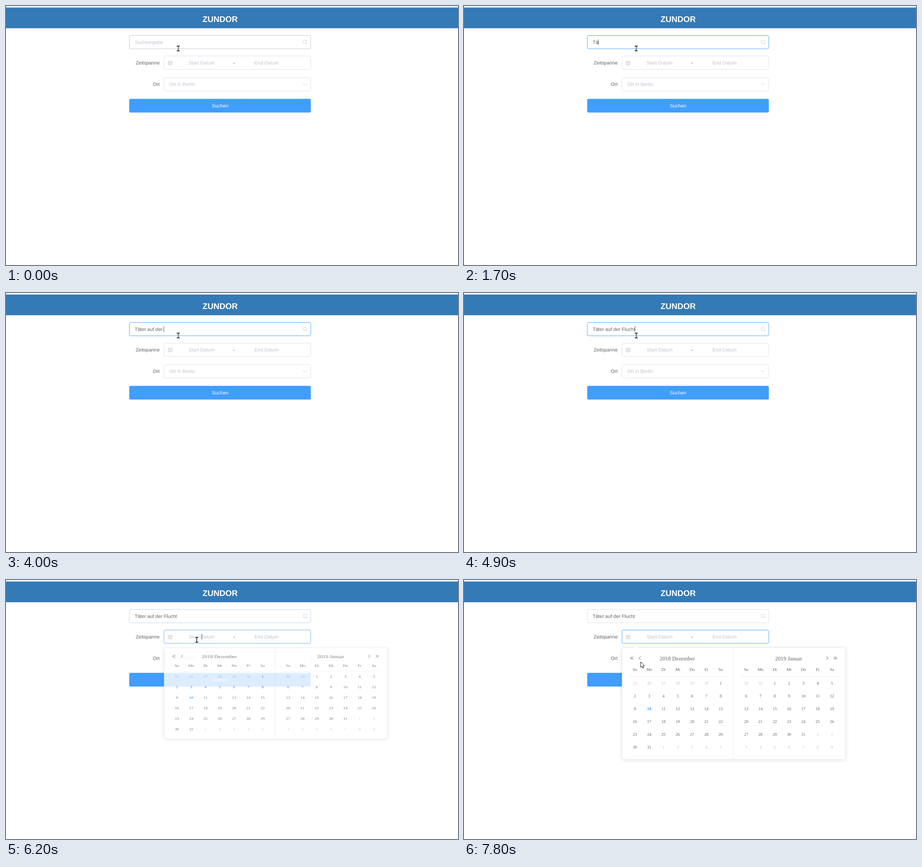
An HTML page for the animation above (8000 ms loop, 988x567 px).

```html
<!DOCTYPE html>
<html lang="de">
<head>
<meta charset="utf-8">
<title>Suche</title>
<style>
  html, body { margin: 0; width: 100%; height: 100%; overflow: hidden; background: #fff; }
  svg { display: block; width: 100%; height: 100%; }
  text { font: 10.6px "Liberation Sans", Arial, sans-serif; fill: #606266; font-kerning: none;
         white-space: pre; text-rendering: geometricPrecision; }
  .mid { text-anchor: middle; }
  .end { text-anchor: end; }
  .hint { fill: #c0c4cc; }
  .field { fill: #fff; stroke: #dcdfe6; stroke-width: .9; }
  .icon { fill: none; stroke: #c0c4cc; stroke-width: .8; }
  .nav { fill: none; stroke: #303133; stroke-width: .85; }
  .caret { fill: #303133; }
  .panel { fill: #fff; stroke: #e4e7ed; stroke-width: .8; filter: drop-shadow(0 1.5px 4px rgba(0, 0, 0, .11)); }
  .rule { stroke: #ebeef5; stroke-width: .9; }
  #popup text { font: 9.2px "Liberation Serif", "Times New Roman", serif; text-anchor: middle; }
  #popup .title { font-size: 12.1px; }
  #popup .out { fill: #c0c4cc; }
  #popup .today { fill: #409eff; font-weight: bold; }
  #popup .hover { fill: #409eff; }
</style>
</head>
<body>
<svg viewBox="0 0 988 567">
  <rect y="3.3" width="988" height="45.4" fill="#337ab7"/>
  <text class="mid" x="468" y="35" style="font-size:18px;font-weight:bold;fill:#fff">ZUNDOR</text>

  <rect id="search" class="field" x="269.6" y="64.5" width="396.5" height="29.2" rx="3"/>
  <text id="searchHint" class="hint" x="281.2" y="82.6">Sucheingabe</text>
  <text id="typed" x="281.2" y="82.6"></text>
  <rect id="searchCaret" class="caret" y="73" width=".85" height="12"/>
  <g class="icon"><circle cx="653.2" cy="78.6" r="3.9"/><path d="M656 81.4l2.4 2.4"/></g>

  <text class="end" x="335.8" y="128">Zeitspanne</text>
  <rect id="dates" class="field" x="345.3" y="109.5" width="320.8" height="29.2" rx="3"/>
  <path class="icon" d="M354.5 121.2h8.4v7.7h-8.4zM354.5 123.3h8.4M356.6 119.8v2.2M360.8 119.8v2.2M356 125.2h5.4M356 127.1h5.4"/>
  <text class="hint mid" x="427.5" y="128">Start Datum</text>
  <text class="mid" x="498.5" y="128" style="fill:#303133">-</text>
  <text class="hint mid" x="569.5" y="128">End Datum</text>
  <rect id="dateCaret" class="caret" x="427.7" y="118" width=".85" height="12"/>

  <text class="end" x="335.8" y="175.2">Ort</text>
  <rect class="field" x="345.3" y="156.9" width="320.8" height="29.2" rx="3"/>
  <text class="hint" x="357" y="175.2">Ort in Berlin</text>
  <path class="icon" d="M649.4 169.3l4 4 4-4"/>

  <rect x="269.3" y="203.3" width="397" height="30" rx="3" fill="#409eff"/>
  <text class="mid" x="468" y="222" style="fill:#fff">Suchen</text>

  <g id="popup">
    <rect class="panel" x="345.4" y="148.4" width="488" height="244.4" rx="3"/>
    <path d="M372 148.9l4.5-4.6 4.5 4.6z" fill="#fff"/>
    <path d="M372 148.4l4.5-4.6 4.5 4.6" fill="none" stroke="#f0f2f6" stroke-width=".7"/>
    <path d="M588.6 148.8v243.6" stroke="#e4e4e4" stroke-width=".8"/>
    <path class="nav" d="M366.6 167.8l-3 3.2 3 3.2M369.8 167.8l-3 3.2 3 3.2M386.2 167.5l-3.4 3.5 3.4 3.5"/>
    <path class="nav" d="M792.2 167.5l3.4 3.5-3.4 3.5M808.6 167.8l3 3.2-3 3.2M811.8 167.8l3 3.2-3 3.2"/>
  </g>

  <g id="cursor">
    <g id="beam" fill="none" stroke-linecap="round">
      <path id="beamShape" d="M-2.7-5.2H2.7M0-5V5M-2.7 5.2H2.7" stroke="#fff" stroke-width="3"/>
      <path d="M-2.7-5.2H2.7M0-5V5M-2.7 5.2H2.7" stroke="#111" stroke-width="1.6"/>
      <path d="M0-3.4V3.4" stroke="#999" stroke-width=".5"/>
    </g>
    <path id="arrow" d="M0 0V12L2.8 9.6L4.7 13.7L6.7 12.8L4.9 8.8H8.6Z" fill="#fff" stroke="#111" stroke-width="1"/>
    <path id="hand" d="M3.2 7.2V1.2Q4.2-.2 5.2 1.2V4.6L10 5.6Q11.4 6 11.2 7.6L10.2 11.6H4.6L.7 7.4Q1.2 6 3.2 7.2Z" fill="#fff" stroke="#111" stroke-width=".9"/>
  </g>
</svg>
<script>
const LOOP = 8000;
const PHRASE = "Täter auf der Flucht";
const $ = id => document.getElementById(id);
const popup = $("popup");

function add(tag, attrs, content = "") {
  const node = document.createElementNS("http://www.w3.org/2000/svg", tag);
  for (const key in attrs) node.setAttribute(key, attrs[key]);
  node.textContent = content;
  popup.append(node);
  return node;
}

function buildMonth(left, title, firstDay, previousLength, today) {
  const width = 31.25;
  const column = i => left + width * (i + .5);
  const days = [];
  add("text", { class: "title", x: left + 108.4, y: 175.8 }, title);
  ["So", "Mo", "Di", "Mi", "Do", "Fr", "Sa"].forEach((name, i) =>
    add("text", { x: column(i), y: 199.2 }, name));
  add("path", { class: "rule", d: `M${left} 211.3h${7 * width}` });
  for (let i = 0; i < 42; i++) {
    const day = firstDay + i;
    const label = day < 1 ? day + previousLength : day > 31 ? day - 31 : day;
    const type = day < 1 || day > 31 ? "out" : day === today ? "today" : "";
    days.push(add("text", { class: type, x: column(i % 7), y: 228.8 + 28.1 * Math.floor(i / 7) }, label));
  }
  return days;
}

const december = buildMonth(357.9, "2018 Dezember", -5, 30, 10);
buildMonth(601.2, "2019 Januar", -1, 31);
const secondOfDecember = december[7];

// Each track holds [start time, value...]; a value stays until the next start.
const letters = [[0, 0], [1300, 1], [1700, 2], [2100, 3], [2200, 4], [2400, 5], [2800, 8], [3200, 9],
  [3300, 11], [3500, 12], [3700, 13], [4000, 14], [4200, 15], [4400, 16], [4600, 17], [4800, 18], [4900, 20]];
const searchBorder = [[0, "#c0c4cc"], [700, "#80b1e6"], [800, "#409eff"], [6200, "#bdd2eb"], [6500, "#dcdfe6"]];
const dateBorder = [[0, "#dcdfe6"], [5800, "#c0c4cc"], [6200, "#66aaf0"], [6500, "#409eff"]];
const popupScale = [[0, 0], [6200, .816], [6500, 1]];
const pointer = [[0, "beam", 376.5, 93], [5600, "beam", 414.2, 128], [5800, "beam", 417, 131],
  [6500, "arrow", 436.8, 156.2], [6700, "arrow", 427, 191.5], [6900, "hand", 397, 226],
  [7100, "hand", 371.3, 254], [7300, "arrow", 402.5, 193], [7500, "arrow", 398.6, 180.5],
  [7800, "arrow", 386.2, 179.2]];

const at = (track, time) => track.findLast(step => step[0] <= time).slice(1);
const show = (node, visible) => node.style.display = visible ? "" : "none";
const within = (time, from, to) => time >= from && time < to;

function draw(time) {
  const [count] = at(letters, time);
  $("typed").textContent = PHRASE.slice(0, count);
  show($("searchHint"), count === 0);
  const textWidth = count ? $("typed").getComputedTextLength() : 0;
  $("searchCaret").setAttribute("x", 281.2 + textWidth - .3);
  show($("searchCaret"), within(time, 700, 5600));
  show($("dateCaret"), within(time, 6200, 6700) || within(time, 7300, 7800));

  $("search").style.stroke = at(searchBorder, time)[0];
  $("dates").style.stroke = at(dateBorder, time)[0];

  const [scale] = at(popupScale, time);
  show(popup, scale > 0);
  popup.setAttribute("opacity", scale);
  popup.setAttribute("transform", `translate(0 ${148 * (1 - scale)}) scale(1 ${scale})`);
  secondOfDecember.classList.toggle("hover", within(time, 7100, 7300));

  const [shape, x, y] = at(pointer, time);
  for (const id of ["beam", "arrow", "hand"]) show($(id), id === shape);
  $("cursor").setAttribute("transform", `translate(${x} ${y})`);
}

function tick() {
  draw(performance.now() % LOOP);
  requestAnimationFrame(tick);
}
tick();
</script>
</body>
</html>
```
